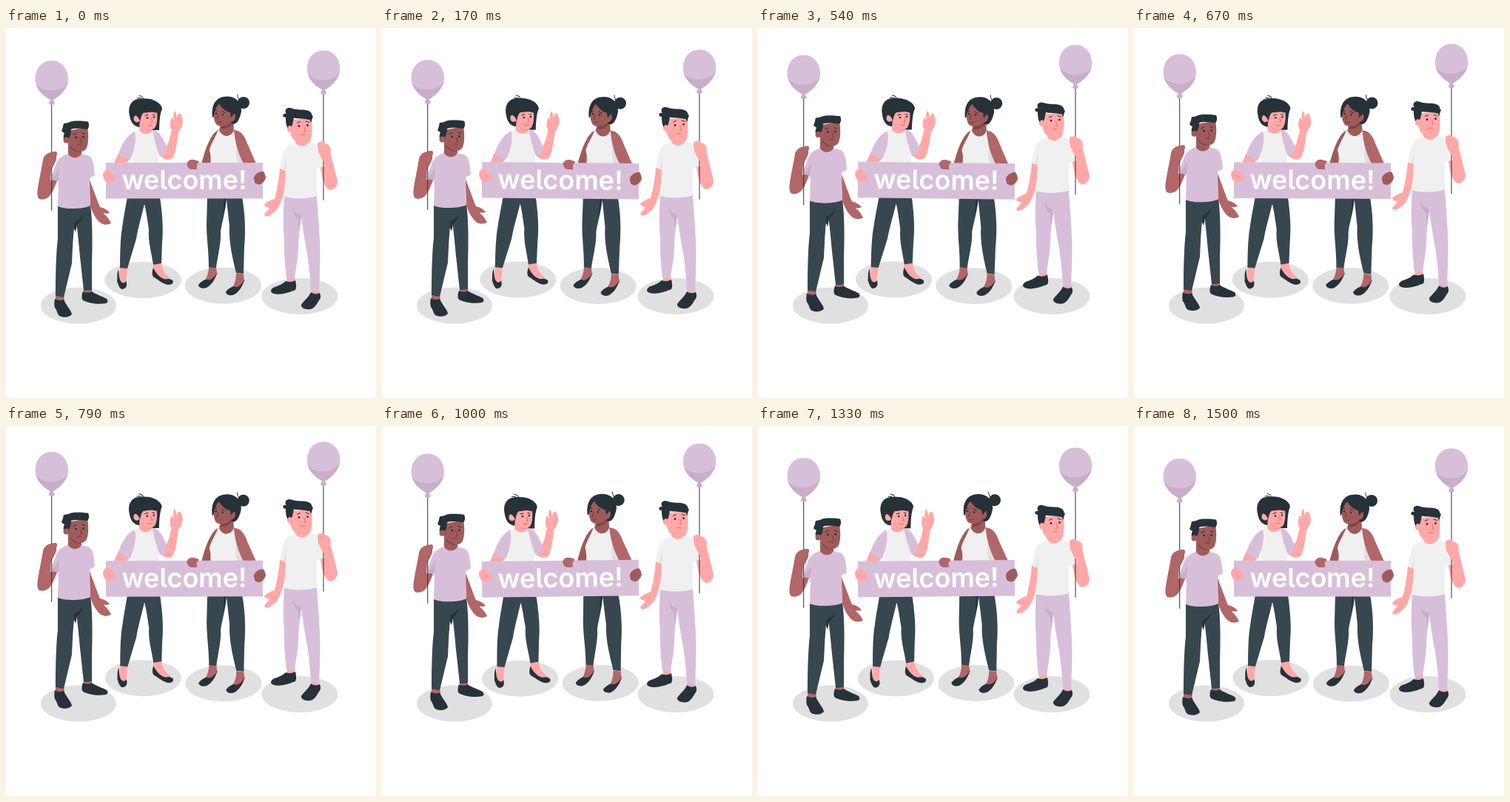
These frames come from a looping animation (500 px wide and 500 px high, 1540 ms). An HTML page:

```html
<!DOCTYPE html>
<html lang="en">
<head>
<meta charset="utf-8">
<title>Welcome</title>
<style>
  html, body { margin: 0; width: 100%; height: 100%; overflow: hidden; background: #fff; }
  svg { display: block; width: 100%; height: 100%; }
  .purple { fill: #d7bfd9; }
  .purple-dark { fill: #c8aecb; }
  .hair { fill: #263238; }
  .jeans { fill: #37474f; }
  .white { fill: #f0f0f0; }
  .fold { fill: #dfdfdf; }
  .shadow { fill: #e0e0e0; }
  .pink { fill: #ffa8a7; }
  .pink-dark { fill: #f28f8f; }
  .brown { fill: #b16668; }
  .brown-face { fill: #9f5b5a; }
  .brown-dark { fill: #7f4345; }
  .line { fill: none; stroke: #263238; stroke-width: 1; stroke-linecap: round; }
  .line.nose-pink { stroke: #e8686c; }
  .line.nose-brown { stroke: #74383b; }
  text { font: 600 36px Inter, "Open Sans", sans-serif; font-feature-settings: "cv05"; fill: #fff; text-anchor: middle; }
</style>
</head>
<body>
<svg viewBox="0 0 500 500">
  <defs>
    <g id="balloon">
      <path class="line" d="M61.7 102V246.3" stroke-linecap="butt"/>
      <path class="purple-dark" d="M61.7 95c2 2 3 4 4 6.500c-1 3-7 3-8 0c1-2.500 2-4.500 4-6.500z"/>
      <path class="purple" d="M61.700 44C75 44 84 55 84 69C84 82 73 92 63 97.500H60.500C50 92 39.500 82 39.500 69C39.500 55 48 44 61.700 44Z"/>
      <path class="purple-dark" d="M41 76C50 87 75 88 83.500 73C81 84 72 93 63 97.500H60.500C51 92 43 85 41 76Z"/>
    </g>
    <g id="flat">
      <path class="brown" d="M274 322L284 323L285 332C280 341 274 344 268 343C272 336 274 330 274 322Z"/>
      <path class="hair" d="M286 330C283 337 280 346 271 351C266 353 260 351 260 347C263 343 267 341 270 339.500C277 343 282 336 286 330Z"/>
    </g>
  </defs>

  <ellipse class="shadow" cx="98" cy="375" rx="51" ry="24.500"/>
  <ellipse class="shadow" cx="397" cy="362.500" rx="51.500" ry="24.500"/>

  <g id="pair">
    <ellipse class="shadow" cx="185" cy="340.500" rx="51.500" ry="24.500"/>
    <ellipse class="shadow" cx="293.500" cy="348" rx="51.500" ry="24.500"/>

    <!-- waving woman -->
    <path class="pink" d="M154 323L164 324L162 344C160 349 154 347 153 340Z"/>
    <path class="hair" d="M152 326C149 334 151 338 150 342C152 347 153 352 157 353C163 352 164 348 162.500 342C159 347 154 344 153 336Z"/>
    <path class="pink" d="M199 318L210 317C211 326 214 332 222 338C212 342 203 335 199 325Z"/>
    <path class="hair" d="M199 324C197 330 197 335 200 337C207 341 212 346 219 347C225 347 227 344 225 341C221 338 218 339 215 339.500C208 338 203 332 199 324Z"/>
    <path class="jeans" d="M164 228H208C211 250 213 270 211 290L210 318L199 320C196 300 192 290 193 272C191 258 189 245 187 238C183 255 178 272 176 285L164 325L154 324C154 300 155 280 157 270C159 255 162 240 164 228Z"/>
    <path class="hair" d="M167 118C164 104 171 95 183 95.500C198 94 210 101 211 109C209 114 207.500 120 207 138H193L182 134C173 134 168 127 167 118Z"/>
    <path class="line" d="M186 97C186 93 183 92 180 91.500M185 97C182 94 180 94 177 95"/>
    <path class="pink" d="M208 172L218 158C222 150 222 143 224 138C220 132 222 126 224 121C226 122 226 124 227 125C226 119 226 114 228 112.500C230 113 230 118 231.500 121C232 115 235 114 237 118C239 122 239.500 127 238.500 130C237 135 235 138 233 141C231 155 230 168 225 176C219 180 212 177 208 172Z"/>
    <path class="pink" d="M152 169L168 177L158 187H144Z"/>
    <path class="white" d="M178 138C171 140 171 148 172 155L171 183H206L207 165C209 152 205 142 200 138Z"/>
    <path class="purple" d="M174 140C166 143 157 154 152 170C158 176 163 178 168 178C173 167 177 152 174 140Z"/>
    <path class="purple" d="M198 138C208 138 212 150 218 162C217 168 213 172 208 174C203 162 200 150 198 138Z"/>
    <path class="pink" d="M181 122L180 138C184 145 194 145 198 138V130Z"/>
    <path class="pink-dark" d="M183 132C187 138 193 140 198 138V132Z"/>
    <path class="pink" d="M180 114L204 113C205 122 204 131 201 135C197 139 190 138 186 135C182 132 180 126 180 114Z"/>
    <ellipse class="pink" cx="177" cy="122.500" rx="4.500" ry="5"/>
    <path class="hair" d="M173 116C176 105 186 100 209 107C207 113 206 115 202 114.500C195 112 191 115 186 114.500C183 117 182 122 181.500 126C179 121 177 118 173 118Z"/>
    <circle class="hair" cx="191" cy="121.500" r="1.300"/>
    <circle class="hair" cx="200" cy="120.500" r="1.300"/>
    <path class="line" d="M188 118.300L192 117.300M198 117L201 117.500"/>
    <path class="line nose-pink" d="M196.500 122L198 127L196 127.300M191.500 131.500C194 132.500 196 132 197.500 131"/>

    <!-- woman with a bun -->
    <use href="#flat"/>
    <use href="#flat" x="37" y="9.500"/>
    <path class="jeans" d="M272 228H319C323 250 324 275 322 295L321 332L311 331C306 310 301 290 302 268L298 232C296 250 292 262 290 275C291 290 286 308 284 324L274 323C274 300 271 285 271 265Z"/>
    <path class="hair" d="M297 229L296 243L293 254L295 229Z"/>
    <path class="brown-face" d="M286 138C277 144 270 160 264 184H278C278 170 282 160 287 150Z"/>
    <path class="white" d="M287 137C284 146 276 158 275 165C277 172 277 178 276 184H314C312 170 314 160 316 155L309 137Z"/>
    <path class="fold" d="M309 140L311 162C310 172 311 180 314 184H323L318 158Z"/>
    <path class="brown" d="M308 138C318 138 323 147 326 156L338 183H321C315 172 310 158 308 138Z"/>
    <path class="brown-face" d="M291 126L307 120L308 138C304 148 293 149 288 138Z"/>
    <path class="brown-dark" d="M291 131C298 133 304 129 307 122V126C303 134 297 137 290.500 136Z"/>
    <circle class="hair" cx="321" cy="101" r="8"/>
    <path class="hair" d="M279 121C277 103 284 92 300 92.500C311 93 319 101 318 113C316 123 312 131 306 129.500L290 110Z"/>
    <path class="line" d="M315 97C314 94 312 92 313 90"/>
    <path class="brown-face" d="M283 107C280 115 280 124 284 130C290 135 300 132 304 127C311 126 312 117 307 114C297 112 292 108 288 102Z"/>
    <path class="hair" d="M288 102C283 107 282 115 279.500 122C278 112 279 104 285 99ZM287 99C291 108 297 113 303 114L304 121L309 115V101Z"/>
    <circle class="hair" cx="284" cy="115.500" r="1.300"/>
    <circle class="hair" cx="293" cy="117" r="1.300"/>
    <path class="line" d="M282.500 111.500L285 111.800M292 112.500L296 114.500"/>
    <path class="line nose-brown" d="M287.500 117L285 122L287 122.800M285.500 127C288 127.700 290 127.500 291.500 126.500"/>

    <!-- banner -->
    <rect class="purple" x="135" y="182" width="212" height="48.500"/>
    <text x="241" y="218">welcome!</text>
    <path class="pink" d="M131 197C133 192 137 190 140 193C145 196 148 200 148 205C144 208 143 209 139 209C134 209 131 203 131 197Z"/>
    <path class="brown" d="M244.500 183C246 178 252 176.500 257 179C260 179 261.500 181 260 182.500C257 183 258 188 258 191H250C247 190 244.500 187 244.500 183Z"/>
    <path class="brown-face" d="M335 205C334 200 339 195 345 194C348 192 350 196 351 202C350 207 346 211 342 211.500C338 211 335 209 336 207Z"/>
  </g>

  <g class="bouncer">
    <!-- man with the left balloon -->
    <path class="brown" d="M112 203C117 215 124 235 127 242C132 243 137 246 140 249.500C138 251.500 134 250 132 251C136 254 139 258 142 263.500C138 267 130 266 126 262C119 255 115 245 114 240Z"/>
    <path class="brown" d="M67 360H78L79 370H67ZM105 353H116V359H105Z"/>
    <path class="hair" d="M66 366C65 371 65 375 66 378C69 381 69 386 72 389C78 392 86 391 89 387C88 381 82 376 78 367C74 369 70 368 66 366Z"/>
    <path class="hair" d="M104 356C102 361 102 366 104 368C112 372 124 374 135 372C138 371 138 368 136 366C129 362 121 360 116 356C112 358 108 358 104 356Z"/>
    <path class="jeans" d="M70 239H114C117 260 117 290 116 320V354L105 355L101 318C99 300 98 285 95 262L92 270C90 290 90 300 89 318L78 364L67 362C67 330 68 300 70 285Z"/>
    <path class="hair" d="M92 263C97 261 102 256 105 251C103 258 99 263 96 266L94 276L92 271Z"/>
    <path class="brown" d="M66 167C70 167 69 171 68 174C67 182 64 187 61 191L60 206L70 204C66 215 62 224 58 228C55 231 49 233 45 231C42 229 42 222 43 216C45 203 48 190 50 178C51 171 58 168 66 167Z"/>
    <path class="purple" d="M84 170C76 172 71 176 68 183L60 204L71 207L70 241C80 245.500 105 245 114 240L113 203L120 199C119 188 118 178 114 174C110 171 105 171 101 170Z"/>
    <path class="purple-dark" d="M72 190L70 215L71 207L62 205Z"/>
    <path class="brown-face" d="M84 152V170C88 177 98 177 102 170V160Z"/>
    <path class="brown-dark" d="M86 160C90 166 96 169 102 167V164Z"/>
    <path class="brown-face" d="M83 139L110 134C112 145 111.500 156 109 162C106 168 99 168 94 165C88 162 84 156 82 150Z"/>
    <path class="hair" d="M75 139C77 135 77 132 78 129C81 129 82 128 84 128C90 124 105 126 111 126.500C113 131 112 135 110 137C101 136 94 135 88 137C88 142 87 146 85 149C83 147 81 149 81 154C77 151 77 146 79 142C77 141 76 140 75 139Z"/>
    <circle class="brown-face" cx="81.500" cy="151.500" r="4"/>
    <circle class="hair" cx="94.500" cy="148" r="1.400"/>
    <circle class="hair" cx="104.500" cy="147.500" r="1.400"/>
    <path class="line" d="M91 144.300L95 142.300M103 142L107 143.500"/>
    <path class="line nose-brown" d="M100 149L102.500 154.500L100 155.500M96 158.500C98 157.500 100 157.700 102 158.500"/>
    <use href="#balloon"/>
    <path class="brown" d="M53 173C56 168 62 168 67 167C70 168 69 171 67.500 173C69 176 68 180 65 183C64 188 61 190 57 190Z"/>

    <!-- man with the right balloon -->
    <path class="pink" d="M370 189L379 192C378 207 376 220 374 228C371 236 368 246 361 250C357 254 351 257 349 252C351 249 354 246 356 243C353 242 349 242 349 239C352 235 359 232 363 231C366 220 369 205 370 189Z"/>
    <path class="pink" d="M380 336H390.500V345H379.500ZM413 355H423.500L424 362H412Z"/>
    <path class="hair" d="M378 342C383 344 387 343 391 341C392 346 393 350 391 354C385 356 381 358 375 359C367 361 359 359 358 356C358 352 362 350 366 349C371 347 375 345 378 342Z"/>
    <path class="hair" d="M412 357C416 360 420 360 424 358C426 363 425 366 423 368C420 373 417 379 411 380C405 381 398 378 399 374C402 369 409 364 412 357Z"/>
    <path class="purple" d="M376 226H420C421 245 423 262 424 290C425 310 424 335 423 357L412 356C411 335 409 318 407 305C404 290 401 270 399 255C397 270 395 285 395 300C394 315 391 330 390 339L379 338C376 310 376 300 376 285C374 265 375 245 376 226Z"/>
    <path class="purple-dark" d="M387 243C390 249 394 252 399 253L398 264L396 274L395 259C391 256 388 250 387 243Z"/>
    <path class="pink" d="M424 184L432 178L438 167C441 180 446 197 448 208C448 214 443 219 438 219C431 217 428 206 426 195Z"/>
    <path class="white" d="M390 156C380 158 376 164 375 168C372 178 371 184 370 190L378 193L376 228C388 231.500 410 231 420 227V190L431 187C429 175 426 162 420 158C416 155 412 155 408 154Z"/>
    <path class="fold" d="M379 173L376 228L378 193L375 192Z"/>
    <path class="pink" d="M391 142V155C396 162 405 161 409 154V148Z"/>
    <path class="pink-dark" d="M392 149C396 155 402 157 408 156V153Z"/>
    <path class="pink" d="M385 124L413 122C414 135 414 146 411 153C407 159 399 159 394 155C388 152 385 146 384 140Z"/>
    <circle class="pink" cx="384" cy="136.500" r="4"/>
    <path class="hair" d="M375 120C373 117 376 115 379 116C375 111 380 106 386 108.500C395 112 403 109 409 112C414 114 416 121 410 124C402 122 395 123 389 121.500C388 127 387 131 386 133C383 131 382 132 380.500 135C378 130 378 125 378 121ZM408 116L415 119L412 128Z"/>
    <circle class="hair" cx="396" cy="132.500" r="1.400"/>
    <circle class="hair" cx="407.500" cy="131.500" r="1.400"/>
    <path class="line" d="M393.500 128.200L397.500 126.500M405 126L409.500 127.500"/>
    <path class="line nose-pink" d="M402.500 133L405 138.500L402.500 139.500M398 144.500C400 143.500 402 143.700 404 144.500"/>
    <use href="#balloon" x="367.300" y="-13.800"/>
    <path class="pink" d="M421 156C425 152.500 430 153 431 156C437 157 440 162 438.500 168C439 176 436 181 432 182C427 181 426 174 423 170C421 165 421 160 421 156Z"/>
  </g>
</svg>
<script>
  const LOOP = 1540, STEPS = 37, RISE = 9, TILT = 0.85;
  const pair = document.getElementById("pair");
  const bouncer = document.querySelector(".bouncer");

  function draw(now) {
    // The motion advances in 24 fps steps; the last pose repeats the first.
    const step = Math.floor((now % LOOP) / LOOP * STEPS + 0.15);
    const angle = step / (STEPS - 1) * 2 * Math.PI;
    bouncer.setAttribute("transform", `translate(0 ${-RISE * (1 - Math.cos(angle)) / 2})`);
    pair.setAttribute("transform", `rotate(${TILT * Math.sin(angle)} 241 206)`);
    requestAnimationFrame(() => draw(performance.now()));
  }
  draw(0);
</script>
</body>
</html>
```
